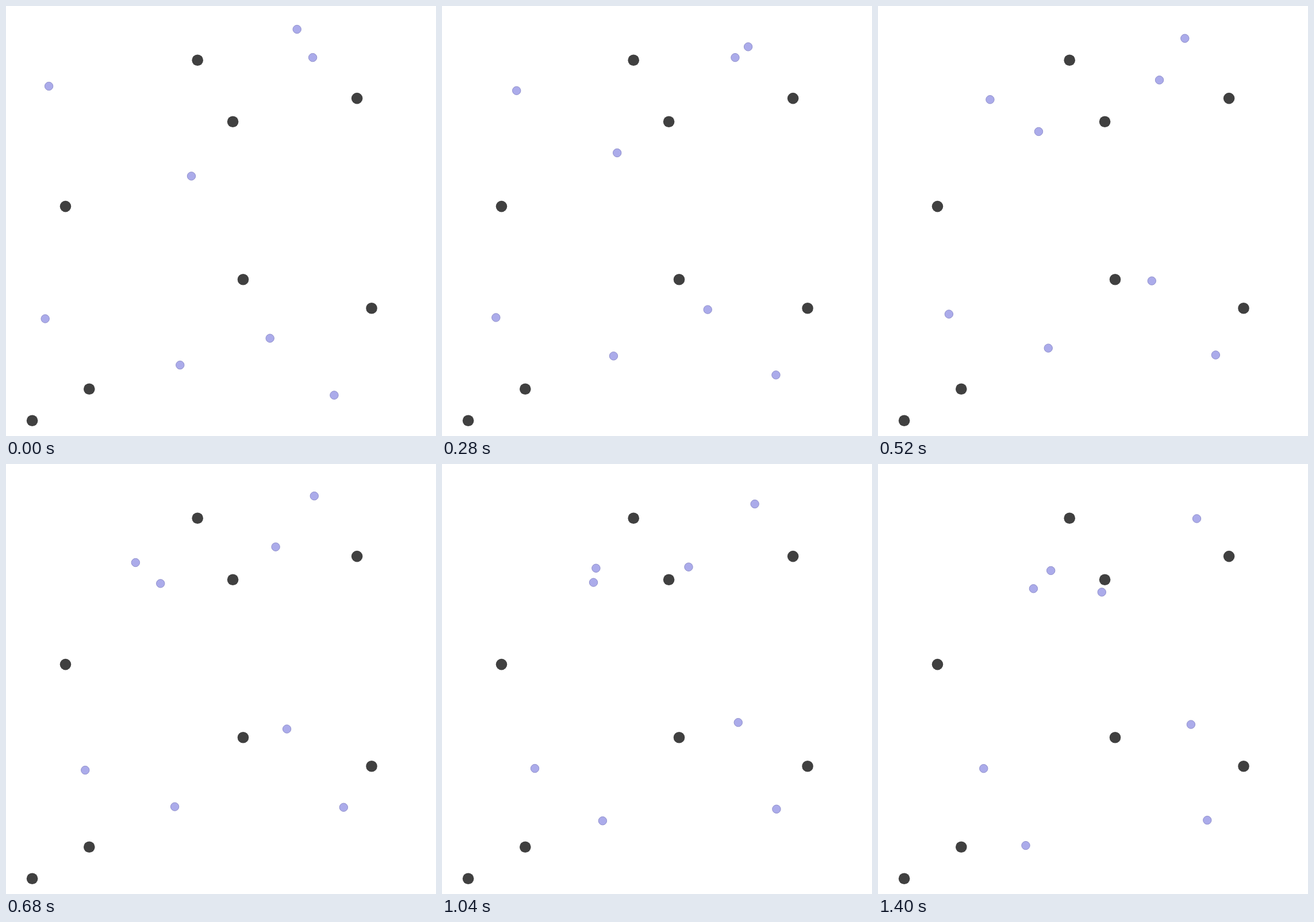
These frames come from a looping animation (748 px wide and 748 px high, 1.44 s). An HTML page:

```html
<!DOCTYPE html>
<html lang="en">
<head>
<meta charset="utf-8">
<title>Drifting dots</title>
<style>
  html, body { margin: 0; width: 100%; height: 100%; overflow: hidden; background: #fff; }
  svg { display: block; width: 100vw; height: 100vh; }
  .fixed { fill: #404040; }
  .mover { fill: #ababea; stroke: #9090cc; stroke-width: 1; }
</style>
</head>
<body>
<svg id="stage" viewBox="0 0 748 748"></svg>
<script>
const LOOP = 1440, STEP = 40;
const stage = document.getElementById('stage');

const anchors = [
  [333.2, 94.2], [610.6, 160.6], [394.6, 201.2], [103.5, 348.6],
  [412.5, 475.8], [636, 525.7], [144.8, 666.2], [45.6, 721.2]
];

// Each moving dot: start, entry to its bend, exit from it, end.
const paths = [
  [[506.2, 40.5], [506.9, 105.7], [451, 158.3], [389.3, 222.9]],
  [[533.6, 89.6], [532.6, 64.6], [539.3, 59.6], [554.5, 95]],
  [[74.6, 139.5], [152, 151.6], [246.5, 177], [300.7, 185.4]],
  [[322.5, 295.9], [296.6, 241], [264, 204.5], [270.4, 216.8]],
  [[68.2, 544], [104, 540.4], [148.8, 530.6], [183.8, 529.7]],
  [[459.2, 578], [465.3, 509.5], [500.1, 452.9], [544.4, 453.1]],
  [[302.8, 624.6], [297.4, 603.1], [288.8, 603.6], [257, 663.6]],
  [[570.9, 677], [584, 628.7], [585.6, 595.4], [572.8, 619.6]]
];

function addDot(kind, r, x = 0, y = 0) {
  const dot = document.createElementNS('http://www.w3.org/2000/svg', 'circle');
  for (const [key, value] of Object.entries({ class: kind, r, cx: x, cy: y })) dot.setAttribute(key, value);
  return stage.appendChild(dot);
}

// Natural cubic spline: smooth inside, straight at both ends.
function spline(ts, vs) {
  const last = ts.length - 1;
  const bend = vs.map(() => 0);
  const slope = i => (vs[i + 1] - vs[i]) / (ts[i + 1] - ts[i]);
  for (let pass = 0; pass < 40; pass++) {
    for (let i = 1; i < last; i++) {
      const a = ts[i] - ts[i - 1], b = ts[i + 1] - ts[i];
      bend[i] = (6 * (slope(i) - slope(i - 1)) - a * bend[i - 1] - b * bend[i + 1]) / (2 * (a + b));
    }
  }
  return t => {
    let i = 0;
    while (i < last - 1 && t > ts[i + 1]) i++;
    const h = ts[i + 1] - ts[i], q = (t - ts[i]) / h, p = 1 - q;
    return p * vs[i] + q * vs[i + 1]
      + h * h / 6 * ((p ** 3 - p) * bend[i] + (q ** 3 - q) * bend[i + 1]);
  };
}

// Shared easing: a slow start, a rush, then a steady drift.
const pace = spline([0, 160, 520, 840, 1400], [0, 0.104, 0.474, 0.697, 1]);
const knots = [0, 360, 840, 1400].map(pace);

anchors.forEach(([x, y]) => addDot('fixed', 9.8, x, y));
const movers = paths.map(points => ({
  dot: addDot('mover', 7.2),
  x: spline(knots, points.map(p => p[0])),
  y: spline(knots, points.map(p => p[1]))
}));

function draw(ms) {
  const s = pace(Math.floor(ms % LOOP / STEP) * STEP);
  for (const { dot, x, y } of movers) {
    dot.setAttribute('cx', x(s).toFixed(2));
    dot.setAttribute('cy', y(s).toFixed(2));
  }
}

const start = performance.now();
function tick() {
  draw(performance.now() - start);
  requestAnimationFrame(tick);
}
tick();
</script>
</body>
</html>
```
